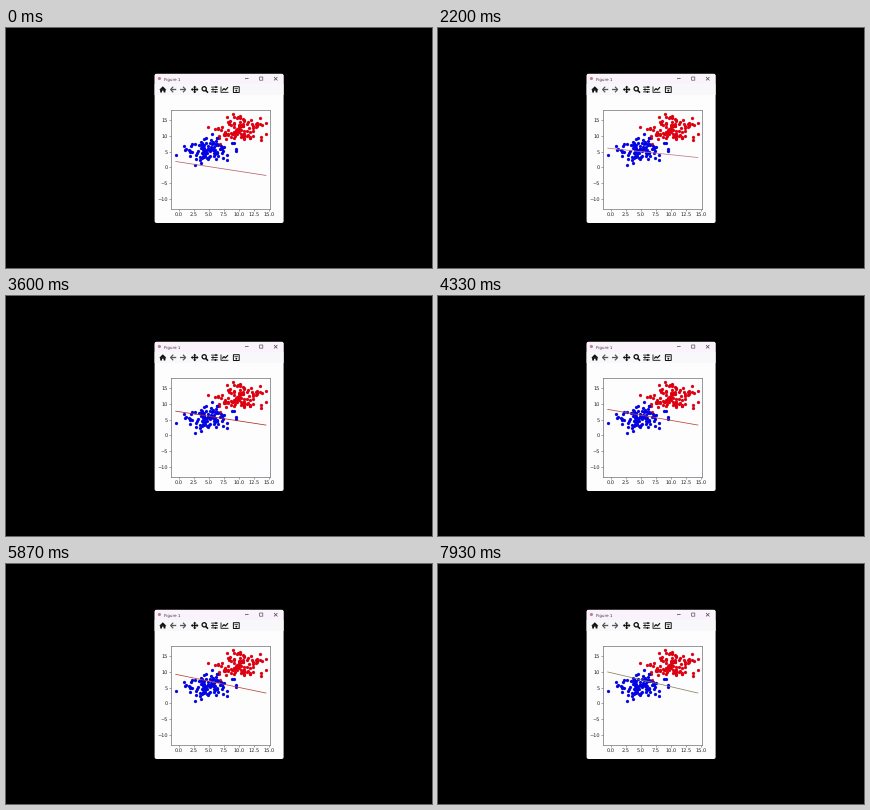
Animation of 426 by 240 pixels, one loop 8 s. Source, as a matplotlib script:

```python
import numpy as np
import matplotlib.pyplot as plt
from matplotlib.animation import FuncAnimation
from matplotlib.patches import Circle, FancyBboxPatch, Polygon, Rectangle

W, H, DPI = 426, 240, 100
FRAMES, LOOP = 120, 8000
PX = 72 / DPI        # points per pixel
K = 0.36             # scale of the plot window
INK = "#111111"

plt.rcParams.update({"font.family": "DejaVu Sans", "toolbar": "None",
                     "text.hinting": "none", "text.hinting_factor": 1})
fig = plt.figure(figsize=(W / DPI, H / DPI), dpi=DPI, facecolor="black")
win = fig.add_axes([0, 0, 1, 1])
win.set(xlim=(0, W), ylim=(H, 0))
win.axis("off")


def rect(x, y, w, h, color, **kw):
    win.add_patch(Rectangle((x, y), w, h, fc=color, lw=0, snap=False, **kw))


def outline(x, y, w, h, color, width):
    win.add_patch(Rectangle((x, y), w, h, fill=False, ec=color,
                            lw=width * PX, snap=False))


def stroke(points, color=INK, width=1.0):
    x, y = zip(*points)
    win.plot(x, y, color=color, lw=width * PX, solid_capstyle="butt",
             snap=False)


def shape(points, color=INK):
    win.add_patch(Polygon(points, fc=color, lw=0, snap=False))


def disc(x, y, r, color=INK):
    win.add_patch(Circle((x, y), r, fc=color, lw=0))


def draw_window():
    body = FancyBboxPatch((148.6, 45.8), 129, 149.2, fc="#fdfdfe", lw=0,
                          boxstyle="round,pad=0,rounding_size=2", zorder=0)
    win.add_patch(body)
    rect(148.6, 45.8, 129, 10.2, "#fbf3fc", clip_path=body)
    rect(148.6, 56, 129, 11, "#f8f7fa")

    disc(153.4, 50.5, 1.6, "#c67f8f")
    win.text(158.3, 52.3, "Figure 1", size=4.1 * PX, color="#333333")
    stroke([(239, 50.6), (242.6, 50.6)], "#555555", 0.8)
    outline(253.6, 49, 3.2, 3.2, "#555555", 0.7)
    stroke([(268, 49), (271.4, 52.4)], "#444444", 0.7)
    stroke([(268, 52.4), (271.4, 49)], "#444444", 0.7)


def arrow(x, y, d):
    stroke([(x - 3 * d, y), (x + 2.2 * d, y)], "#555555", 1.3)
    stroke([(x, y - 2.8), (x + 2.6 * d, y), (x, y + 2.8)], "#555555", 1.2)


def draw_toolbar():
    y = 61.5
    # home
    shape([(153.2, y + 0.3), (156.8, y - 3.2), (160.4, y + 0.3)])
    for x in (154.2, 157.6):
        rect(x, y, 1.8, 3, INK)
    rect(154.2, y, 5.2, 1.2, INK)
    # back and forward
    arrow(167.2, y, -1)
    arrow(177, y, 1)
    # pan
    x = 188.7
    stroke([(x - 3, y), (x + 3, y)], width=1.3)
    stroke([(x, y - 3), (x, y + 3)], width=1.3)
    for s in (-1, 1):
        shape([(x + 3.8 * s, y), (x + 2 * s, y - 1.7), (x + 2 * s, y + 1.7)])
        shape([(x, y + 3.8 * s), (x - 1.7, y + 2 * s), (x + 1.7, y + 2 * s)])
    # zoom
    win.add_patch(Circle((198.2, y - 0.7), 2.1, fill=False, ec=INK, lw=1.3 * PX))
    stroke([(199.6, y + 0.8), (202, y + 3.2)], width=1.6)
    # sliders
    for dy, knob in ((-2.4, 210), (0, 207), (2.4, 209.5)):
        stroke([(205.2, y + dy), (211.8, y + dy)], width=0.9)
        rect(knob - 0.7, y + dy - 1, 1.4, 2, INK)
    # chart
    stroke([(215, y - 3), (215, y + 2.8), (222.4, y + 2.8)], width=0.9)
    stroke([(216.2, y + 1), (218, y - 0.9), (219.4, y + 0.4), (222, y - 2.3)],
           width=1.2)
    # save
    outline(227.4, y - 2.8, 5.8, 5.8, INK, 1.0)
    stroke([(228.4, y - 0.8), (231.9, y - 0.8)], width=0.8)
    disc(230.3, y + 1.2, 0.9)


draw_window()
draw_toolbar()

# two clusters of points
np.random.seed(0)
n = 100
top = np.random.normal(10, 2, n), np.random.normal(12, 2, n)
low = np.random.normal(5, 2, n), np.random.normal(6, 2, n)
xs = np.concatenate([top[0], low[0]])
x0, x1 = xs.min(), xs.max()
pad = 0.05 * (x1 - x0)

left, right, upper, lower = 165.2, 264.4, 82.3, 181.0
ax = fig.add_axes([left / W, 1 - lower / H,
                   (right - left) / W, (lower - upper) / H])
ax.set_facecolor("#fdfdfe")
for cloud, color in ((top, "#de0010"), (low, "#0404e2")):
    ax.scatter(*cloud, color=color, s=36 * K ** 2, lw=0.5 * K, snap=False)
ax.set(xlim=(x0 - pad, x1 + pad), ylim=(-13.1, 18.05),
       xticks=np.arange(0, 15.1, 2.5), yticks=np.arange(-10, 16, 5))
ax.xaxis.set_major_formatter("{x:.1f}")
ax.tick_params(width=0.6 * PX, length=3.5 * K, pad=3.5 * K,
               labelsize=10 * K, color="#666670", labelcolor="#222222")
for spine in ax.spines.values():
    spine.set(linewidth=0.8 * PX, edgecolor="#808088")

COLORS = ["#b4606c", "#1f77b4", "#2ca02c", "#cfc72a", "#b8432f", "#b8432f",
          "#a82a22", "#4f6f78", "#4f6f78", "#c07a86", "#8a7f5a", "#8a7f5a"]
line, = ax.plot([], [], lw=1.5 * K)


def update(i):
    t = i * LOOP / FRAMES / 1000
    ya = 1.9 + 9 * (1 - np.exp(-t / 3.5))
    yb = -2.5 + 5.8 * (1 - np.exp(-t / 0.6))
    line.set_data([x0, x1], [ya, yb])
    line.set_color(COLORS[i % len(COLORS)])
    return line,


anim = FuncAnimation(fig, update, frames=FRAMES, interval=LOOP / FRAMES,
                     repeat=True, repeat_delay=0)
plt.show()
```
